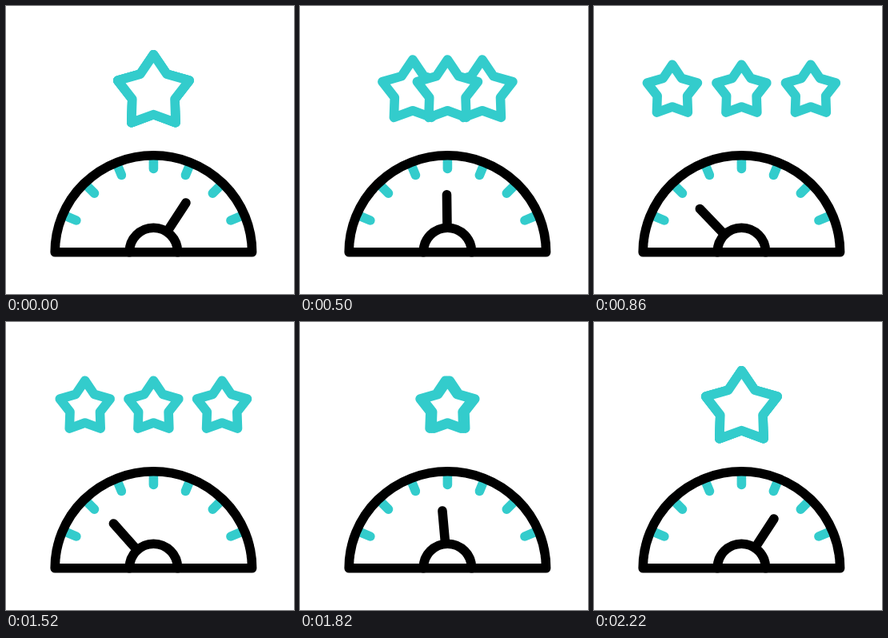
These frames come from a looping animation (360x360 px, 2.4 s). An HTML page:

```html
<!DOCTYPE html>
<html lang="en">
<head>
<meta charset="utf-8">
<title>Rating gauge</title>
<style>
  html, body { margin: 0; width: 100%; height: 100%; overflow: hidden; background: #fff; }
  svg { display: block; width: 100vw; height: 100vh; }
</style>
</head>
<body>
<svg viewBox="0 0 360 360" fill="none" stroke-width="11.6" stroke-linecap="round" stroke-linejoin="round">
  <g stroke="#33cccc">
    <path id="ticks"/>
    <g fill="#fff">
      <path id="left"/>
      <path id="right"/>
      <path id="middle"/>
    </g>
  </g>
  <g stroke="#000">
    <path id="needle"/>
    <path d="M61.2 307.8A123.2 121 0 0 1 307.6 307.8Z"/>
    <path d="M154.2 307.8A30.2 30.6 0 0 1 214.6 307.8"/>
  </g>
</svg>
<script>
const LOOP = 2400;
const CX = 184.4, CY = 308;
const SPREAD = 86.5;

const el = id => document.getElementById(id);
const [ticks, left, right, middle, needle] =
  ['ticks', 'left', 'right', 'middle', 'needle'].map(el);

const mix = (a, b, p) => a + (b - a) * p;
const ramp = (t, from, to) => Math.min(1, Math.max(0, (t - from) / (to - from)));
const ease = p => p * p * (3 - 2 * p);
const glide = p => mix(p, ease(p), 0.25);

// Point at a clockwise angle from straight up, in degrees
function polar(x, y, r, deg) {
  const a = deg * Math.PI / 180;
  return `${(x + r * Math.sin(a)).toFixed(2)} ${(y - r * Math.cos(a)).toFixed(2)}`;
}

const spoke = (deg, inner, outer) =>
  `M${polar(CX, CY, inner, deg)}L${polar(CX, CY, outer, deg)}`;

function star(x, y, outer) {
  const inner = outer * 0.595;
  const points = Array.from({ length: 10 }, (_, i) =>
    polar(x, y, i % 2 ? inner : outer, i * 36));
  return `M${points.join('L')}Z`;
}

function draw(t) {
  const out = ease(ramp(t, 200, 800));
  const spread = out - ease(ramp(t, 1500, 1860));
  const shrink = out - ease(ramp(t, 1860, 2220));
  const swing = glide(ramp(t, 210, 860)) - glide(ramp(t, 1500, 2140));

  const y = mix(107.7, 106.3, shrink);
  const size = mix(47, 33.1, shrink);
  const shift = SPREAD * spread;
  left.setAttribute('d', star(CX - shift, y, size));
  right.setAttribute('d', star(CX + shift, y, size));
  middle.setAttribute('d', star(CX, y, size));

  const angle = mix(33.2, -43.7, swing);
  needle.setAttribute('d', spoke(angle, 31, 72.3 + 0.0016 * angle * angle));
}

ticks.setAttribute('d', [-3, -2, -1, 0, 1, 2, 3]
  .map(i => spoke(i * 22.5, 104.5, 119)).join(''));

const start = performance.now();
function tick() {
  draw((performance.now() - start) % LOOP);
  requestAnimationFrame(tick);
}
tick();
</script>
</body>
</html>
```
